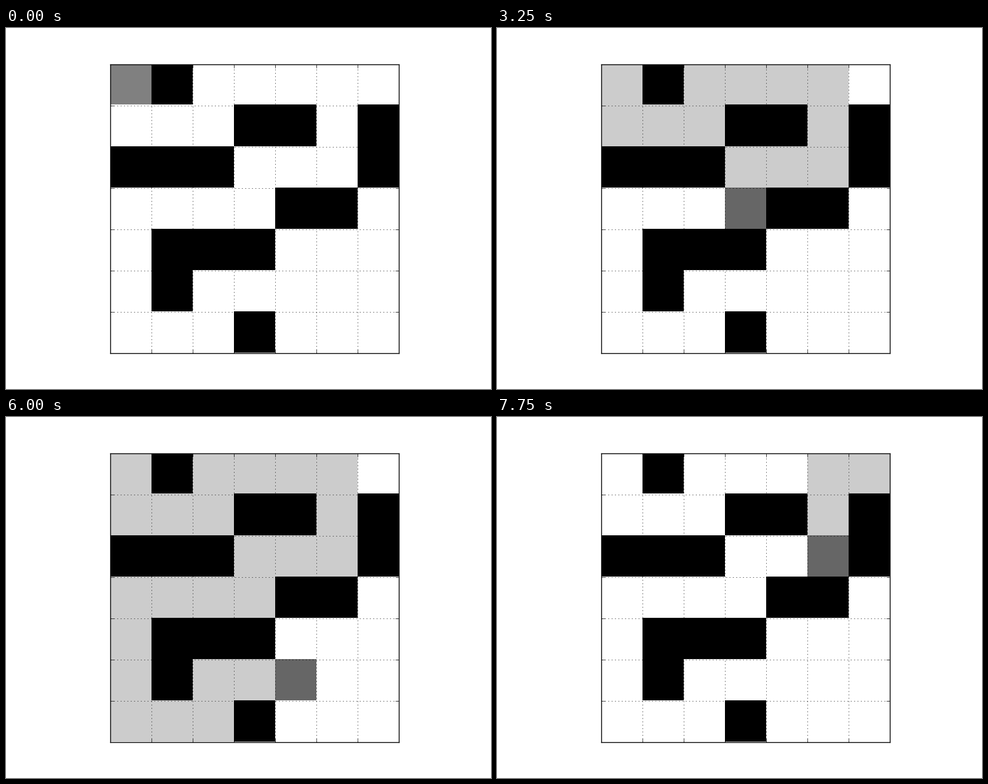
A matplotlib script for the animation above (8 s loop, 800 px wide and 595 px high).

```python
import numpy as np
import matplotlib.pyplot as plt
from matplotlib.animation import FuncAnimation

W, H, DPI = 800, 595, 100
CELL, N = 68, 7
FRAMES, INTERVAL = 32, 250
START, HEAD, TRAIL = 0.5, 0.4, 0.8

plt.rcParams.update({
    "lines.scale_dashes": False,
    "lines.dotted_pattern": (1, 3),
    "axes.axisbelow": False,
})

WALLS = [".#.....",
         "...##.#",
         "###...#",
         "....##.",
         ".###...",
         ".#.....",
         "...#..."]
MAZE = np.array([[0.0 if c == "#" else 1.0 for c in row] for row in WALLS])

STEPS = {"U": (-1, 0), "D": (1, 0), "L": (0, -1), "R": (0, 1)}


def walk(start, moves):
    path = [start]
    for m in moves:
        dr, dc = STEPS[m]
        r, c = path[-1]
        path.append((r + dr, c + dc))
    return path


FIRST = walk((0, 0), "DRRURRRDDLLDLLLDDDRRURRRDR")
SECOND = walk((0, 6), "LDD")


def board(i):
    """Maze with the trail and the walker at step i."""
    grid = MAZE.copy()
    if i == 0:
        grid[FIRST[0]] = START
        return grid
    i -= 1
    path = FIRST[:i + 1] if i < len(FIRST) else SECOND[:i - len(FIRST) + 1]
    for cell in path:
        grid[cell] = TRAIL
    grid[path[-1]] = HEAD
    return grid


fig = plt.figure(figsize=(W / DPI, H / DPI), dpi=DPI, facecolor="white")
side = CELL * N
# A hair below the half pixel, so that horizontal lines snap downwards
ax = fig.add_axes([172 / W, 59.49 / H, side / W, side / H])

# The cells sit half a pixel above the grid lines
up = 0.51 / CELL
image = ax.imshow(board(0), cmap="gray", vmin=0, vmax=1,
                  interpolation="nearest", aspect="auto",
                  extent=(-0.5, N - 0.5, N - 0.5 - up, -0.5 - up))
ax.set_xlim(-0.5, N - 0.5)
ax.set_ylim(N - 0.5, -0.5)

ticks = np.arange(0.5, N - 1)
ax.set_xticks(ticks)
ax.set_yticks(ticks)
ax.tick_params(direction="in", length=4, width=0.5, top=True, right=True,
               labelbottom=False, labelleft=False)
ax.grid(True, color="black", linestyle=":", linewidth=0.5)
for spine in ax.spines.values():
    spine.set_linewidth(1.0)


def update(i):
    image.set_data(board(i))
    return [image]


anim = FuncAnimation(fig, update, frames=FRAMES, interval=INTERVAL,
                     repeat=True, blit=False)
plt.show()
```
